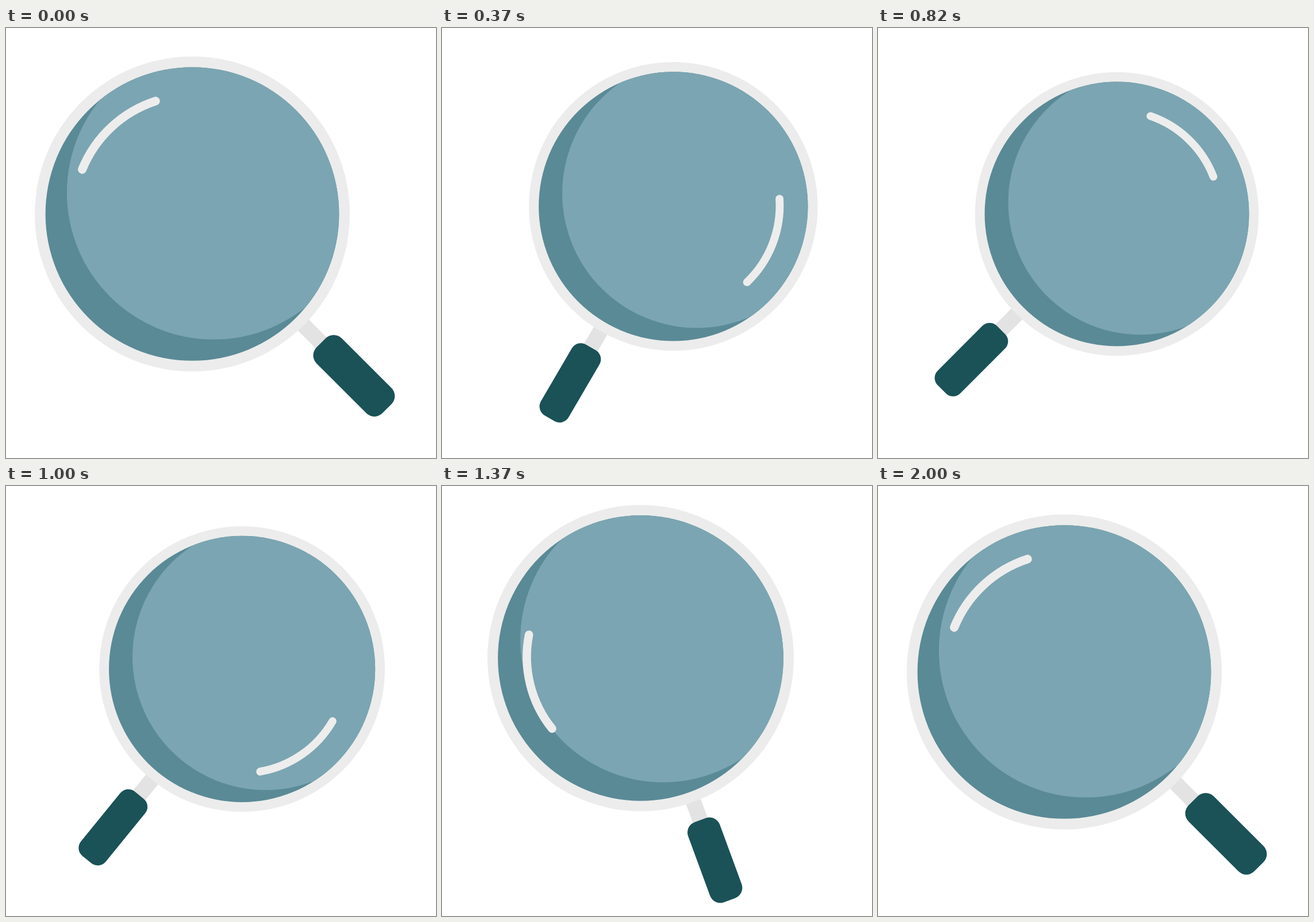
Recreate the animation shown at these times as an HTML page with a canvas. Size 748 by 748 pixels, loop 2.02 s.

```html
<!DOCTYPE html>
<html lang="en">
<head>
<meta charset="utf-8">
<title>Magnifier</title>
<style>
html, body { margin: 0; width: 100%; height: 100%; overflow: hidden; background: #fff; }
canvas { display: block; width: 748px; height: 748px; }
</style>
</head>
<body>
<canvas id="stage" width="748" height="748"></canvas>
<script>
const ctx = document.getElementById('stage').getContext('2d');
const LOOP = 2020;
const RAD = Math.PI / 180;

// Cubic bezier easing with control points (x1, 0) and (x2, 1)
function ease(u, x1, x2) {
  if (u <= 0) return 0;
  if (u >= 1) return 1;
  let lo = 0, hi = 1, s = 0.5;
  for (let i = 0; i < 30; i++) {
    s = (lo + hi) / 2;
    const x = 3 * (1 - s) * (1 - s) * s * x1 + 3 * (1 - s) * s * s * x2 + s * s * s;
    if (x < u) lo = s; else hi = s;
  }
  return s * s * (3 - 2 * s);
}

// Swing of the handle: 0 = lower right, 1 = lower left
function swing(t) {
  return t < 733 ? ease(t / 680, 0.335, 0.2) : 1 - ease((t - 803) / 1197, 0.45, 0.2);
}

// Two turns of the glint: time, degrees, degrees per ms
const SPIN = [
  [0, 0, 0], [200, 60.3, 0.5], [600, 299, 0.66], [1000, 547.7, 0.46],
  [1200, 619.8, 0.27], [1600, 693.4, 0.11], [2000, 720, 0]
];

function spin(t) {
  if (t >= 2000) return 720;
  let i = 0;
  while (t >= SPIN[i + 1][0]) i++;
  const [t0, a, va] = SPIN[i], [t1, b, vb] = SPIN[i + 1];
  const d = t1 - t0, u = (t - t0) / d, v = 1 - u;
  return a * v * v * (1 + 2 * u) + b * u * u * (3 - 2 * u) + d * u * v * (va * v - vb * u);
}

function disc(x, y, r, color) {
  ctx.fillStyle = color;
  ctx.beginPath();
  ctx.arc(x, y, r, 0, 2 * Math.PI);
  ctx.fill();
}

function draw(t) {
  const p = swing(t);
  const angle = (45 + 90 * p) * RAD;
  const q = 0.5 - Math.cos(angle) / Math.SQRT2;
  const lift = Math.max(0, Math.sin(angle) - Math.SQRT1_2);
  const v = lift / (1 - Math.SQRT1_2);

  const x = 324 + 91.5 * q - 18 * p * Math.pow(1 - p, 3);
  const y = 323.5 - (92 + 72 * q - 95 * q * q) * lift;
  const R = 274 - 27.3 * p;
  const lens = R * 0.932;

  ctx.fillStyle = '#fff';
  ctx.fillRect(0, 0, 748, 748);

  // Stem and grip
  const dist = R * (1.4525 - 0.0545 * Math.pow(v, 0.6));
  const len = R * (0.591 - 0.043 * v);
  const wid = R * (0.226 - 0.0075 * v);
  ctx.save();
  ctx.translate(x, y);
  ctx.rotate(angle);
  ctx.fillStyle = '#e3e3e3';
  ctx.fillRect(R * 0.95, -13.5, dist - R * 0.95, 27);
  ctx.fillStyle = '#1a5257';
  ctx.beginPath();
  ctx.roundRect(dist - len / 2, -wid / 2, len, wid, R * 0.072);
  ctx.fill();
  ctx.restore();

  // Rim, shade and glass
  disc(x, y, R, '#ececec');
  disc(x, y, lens, '#5a8a96');
  ctx.save();
  ctx.beginPath();
  ctx.arc(x, y, lens, 0, 2 * Math.PI);
  ctx.clip();
  disc(x + 41 - 3.7 * (1 - p) * (1 - p), y - 37 + 17 * p, lens, '#7ba5b2');
  ctx.restore();

  // Glint, drifting up a little as the handle passes below
  const mid = 227 + spin(t);
  ctx.strokeStyle = '#ededed';
  ctx.lineWidth = R * 0.0548;
  ctx.lineCap = 'round';
  ctx.beginPath();
  ctx.arc(x + 1.5 * v, y - 2.6 * v, 206.5 - 26.5 * p, (mid - 25) * RAD, (mid + 25) * RAD);
  ctx.stroke();
}

const start = performance.now();
function frame() {
  draw((performance.now() - start) % LOOP);
  requestAnimationFrame(frame);
}
frame();
</script>
</body>
</html>
```
